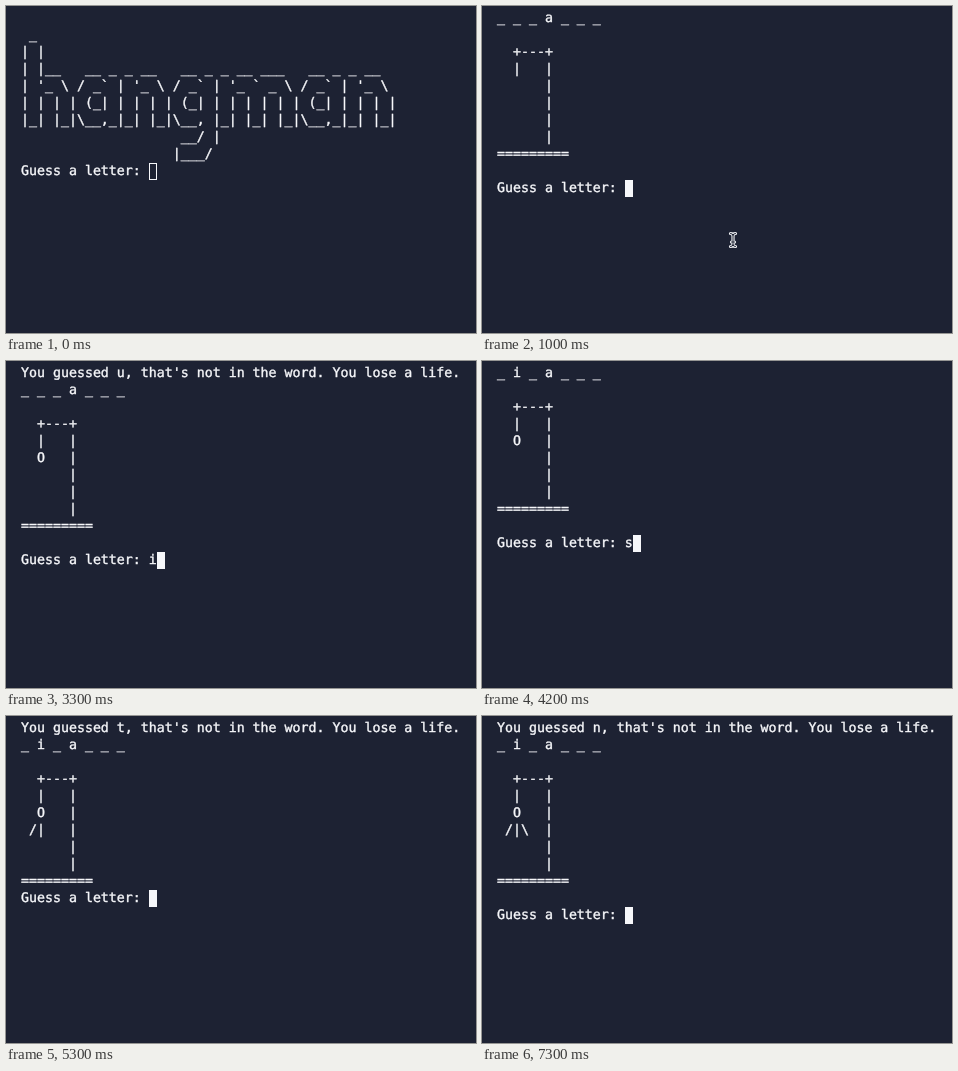
These frames come from a looping animation (470 by 327 pixels, 8 s). An HTML page:

```html
<!DOCTYPE html>
<html lang="en">
<head>
<meta charset="utf-8">
<title>Hangman in a terminal</title>
<style>
  html, body { margin: 0; width: 100%; height: 100%; overflow: hidden; background: #1d2233; }
  pre {
    position: absolute; left: 15px; top: 4px; margin: 0;
    font: 13.288px/17px "DejaVu Sans Mono", monospace; color: #f6f7fa;
    text-rendering: geometricPrecision; -webkit-text-stroke: 0.4px #f6f7fa;
  }
  #caret { position: absolute; width: 8px; height: 17px; box-sizing: border-box; border: 1px solid #f6f7fa; }
  #caret.on { background: #f6f7fa; }
  #beam { position: absolute; left: 0; top: 0; overflow: visible; fill: none; stroke-linecap: round; }
</style>
</head>
<body>
<pre id="screen"></pre>
<div id="caret"></div>
<svg id="beam" width="1" height="1">
  <defs><path id="shape" d="M-2.5-6.5Q0-6.5 0-4.5Q0-6.5 2.5-6.5M-2.5 6.5Q0 6.5 0 4.5Q0 6.5 2.5 6.5M0-4.5V4.5M-1.5 2H1.5"/></defs>
  <use href="#shape" stroke="#f0f1f4" stroke-width="3.2"/>
  <use href="#shape" stroke="#1d2233" stroke-width="1"/>
</svg>
<script>
const LOOP = 8000;
const $ = id => document.getElementById(id);

const title = String.raw`
 _
| |
| |__   __ _ _ __   __ _ _ __ ___   __ _ _ __
| '_ \ / _${"`"} | '_ \ / _${"`"} | '_ ${"`"} _ \ / _${"`"} | '_ \
| | | | (_| | | | | (_| | | | | | | (_| | | | |
|_| |_|\__,_|_| |_|\__, |_| |_| |_|\__,_|_| |_|
                    __/ |
                   |___/`.split("\n");

// One round of the game: word so far, head, body, wrong letter
function round(word, head = " ", body = "   ", wrong = "", gap = true) {
  const post = "      |";
  const rows = [
    word, "", "  +---+", "  |   |", `  ${head}   |`, ` ${body}  |`,
    post, post, "=".repeat(9)
  ];
  if (wrong) rows.unshift(`You guessed ${wrong}, that's not in the word. You lose a life.`);
  if (gap) rows.push("");
  return rows;
}

const one = "_ _ _ a _ _ _", two = "_ i _ a _ _ _";
const start = round(one);
const missU = round(one, "O", "   ", "u");
const hitI = round(two, "O");
const missS = round(two, "O", " | ", "s");
const missT = round(two, "O", "/| ", "t", false);
const missN = round(two, "O", "/|\\", "n");

// [time, rows above the prompt, typed letter]
const steps = [
  [0, title, ""],
  [800, title, "a"],
  [1000, start, ""],
  [2400, missU, ""],
  [3300, missU, "i"],
  [3500, hitI, ""],
  [4200, hitI, "s"],
  [4500, missS, ""],
  [5300, missT, ""],
  [7000, missT, "n"],
  [7300, missN, ""]
];

// Mouse positions, one every 100 ms
const path = [[35, 133], [135, 222], [225, 280], [251, 234]];
let shown;

function draw(now) {
  const t = now % LOOP;
  const step = steps.findLast(s => s[0] <= t);
  if (step !== shown) {
    const [, rows, typed] = shown = step;
    const prompt = "Guess a letter: " + typed;
    $("screen").textContent = [...rows, prompt].join("\n");
    $("caret").style.left = 15 + 8 * prompt.length + "px";
    $("caret").style.top = 4 + 17 * rows.length + "px";
  }
  $("caret").className = t < 400 ? "" : "on";

  const visible = t >= 100 && t < 2400;
  $("beam").style.display = visible ? "" : "none";
  if (visible) {
    const [x, y] = path[Math.min(3, Math.floor(t / 100) - 1)];
    $("beam").style.transform = `translate(${x}px, ${y}px)`;
  }
}

const t0 = performance.now();
function tick() {
  draw(performance.now() - t0);
  requestAnimationFrame(tick);
}
tick();
</script>
</body>
</html>
```
